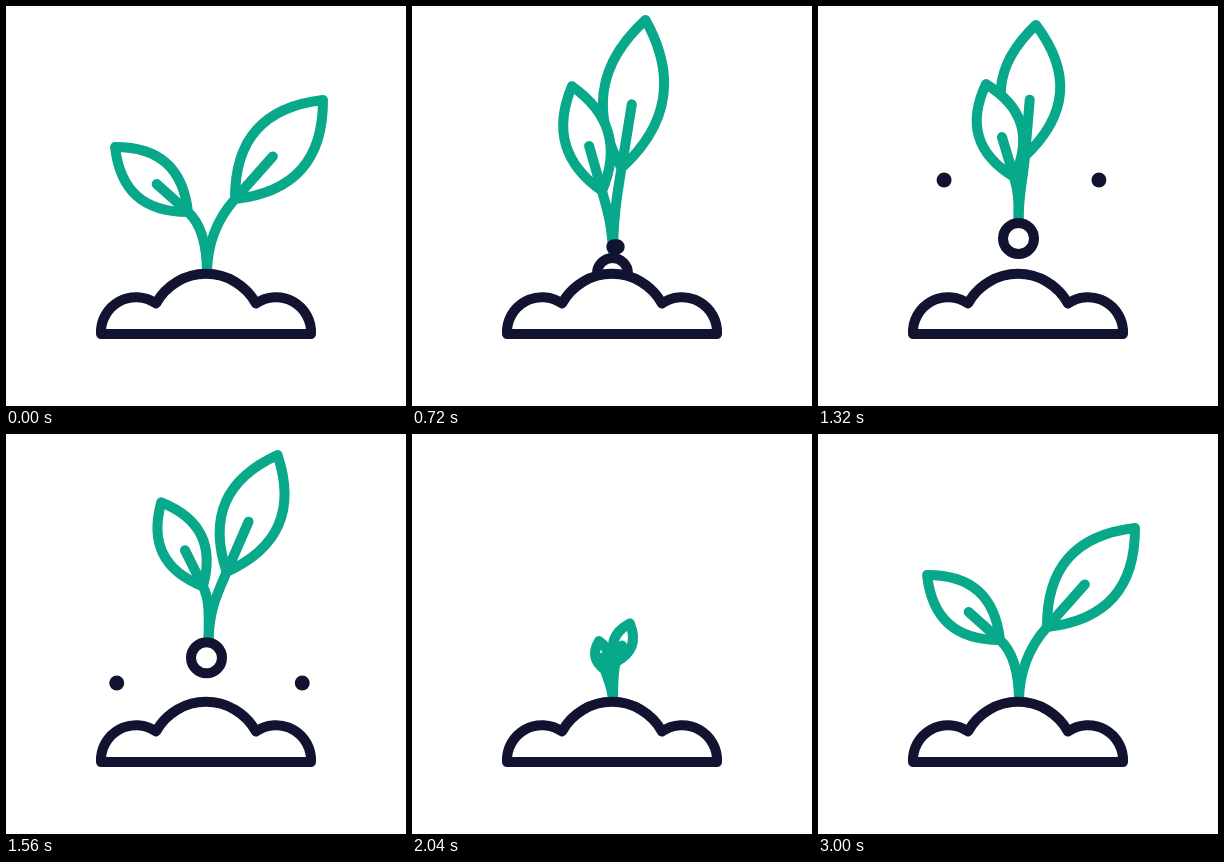
Animation, 400 px wide and 400 px high, one loop 5.63 s. Source, as an HTML page:

```html
<!DOCTYPE html>
<html lang="en">
<head>
<meta charset="utf-8">
<title>Sprout</title>
<style>
  html, body { margin: 0; height: 100%; overflow: hidden; background: #fff; }
  svg { display: block; width: 100%; height: 100%; }
  .line { fill: none; stroke-width: 10; stroke-linecap: round; stroke-linejoin: round; }
  .filled { fill: #fff; }
  .green { stroke: #08a88a; }
  .dark { stroke: #121331; }
</style>
</head>
<body>
<svg viewBox="0 0 400 400">
  <g id="flyer">
    <path class="line green"/>
    <path class="line green filled"/>
    <circle id="seed" class="line dark filled" cx="200.5" r="15.5"/>
  </g>
  <g id="sprout">
    <path class="line green"/>
    <path class="line green filled"/>
  </g>
  <g id="dots" fill="#121331"><circle r="7.5"/><circle r="7.5"/></g>
  <path class="line dark filled" d="M95 328A35 35 0 0 1 150 297.5A57 57 0 0 1 250 297.5A35 35 0 0 1 305 328Z"/>
</svg>
<script>
const LOOP = 5630, STEP = 30;
const $ = id => document.getElementById(id);
const flyer = $('flyer'), sprout = $('sprout'), seed = $('seed'), dots = $('dots');

// Each key: time, root x y, then per leaf (left, right): base x y, angle from upright, length
const grown = [201, 268, 182, 206, -48.3, 97.7, 229, 193, 41.6, 132.5];
const flyerKeys = [
  [0, ...grown],
  [570, 201, 258, 188, 194, -26, 105, 215, 172, 19, 141],
  [720, 201, 252, 190, 185, -16, 109, 209.5, 162, 9.2, 150],
  [1320, 200.5, 217, 196, 171, -16.8, 97, 207, 150, 4.8, 131.5],
  [1770, 204, 205.5, 197, 141, -32.7, 92.6, 230, 131, 36.3, 126.6]
];
const sproutKeys = [
  [1920, 201, 268, 201, 268, -5, 0, 201, 268, 5, 0],
  [2040, 201, 268, 193, 236, -11.7, 29.6, 204, 228, 19.7, 41],
  [2520, 201, 268, 187, 212, -42.6, 85.6, 222, 199, 37.7, 116],
  [3000, ...grown]
];

const clamp = x => Math.min(1, Math.max(0, x));
const progress = (t, from, to) => clamp((t - from) / (to - from));
const smooth = p => p * p * (3 - 2 * p);

// Smooth curve through the keys, at rest at both ends
function sample(keys, t) {
  const last = keys.length - 1;
  let i = 0;
  while (i < last - 1 && t > keys[i + 1][0]) i++;
  const a = keys[i], b = keys[i + 1], span = b[0] - a[0];
  const p = progress(t, a[0], b[0]), q = 1 - p;
  const slope = (k, c) => k === 0 || k === last ? 0 :
    (keys[k + 1][c] - keys[k - 1][c]) / (keys[k + 1][0] - keys[k - 1][0]) * span;
  return a.slice(1).map((v, n) => {
    const c = n + 1;
    return v + (b[c] - v) * smooth(p) + p * q * (q * slope(i, c) - p * slope(i + 1, c));
  });
}

function leafPath(rootX, rootY, [x, y, angle, length], fullLength) {
  const a = angle * Math.PI / 180, sin = Math.sin(a), cos = Math.cos(a);
  const bulge = 0.3 * Math.min(length, fullLength);
  const at = (along, side) => {
    const u = along * length, v = side * bulge;
    return `${(x + u * sin + v * cos).toFixed(2)} ${(y - u * cos + v * sin).toFixed(2)}`;
  };
  const outline = `M${at(0, 0)}C${at(.335, -1)} ${at(.665, -1)} ${at(1, 0)}` +
    `C${at(.665, 1)} ${at(.335, 1)} ${at(0, 0)}Z`;
  const vein = `M${at(0, 0)}L${at(.43, 0)}`;
  const bend = rootY - (rootY - y) * .45;
  const stem = `M${rootX} ${rootY}C${rootX} ${bend} ${at(-.18, 0)} ${at(0, 0)}` +
    `C${at(-.18, 0)} ${rootX} ${bend} ${rootX} ${rootY}`;
  return outline + vein + stem;
}

function drawPlant(group, pose) {
  const [rootX, rootY] = pose, [right, left] = group.querySelectorAll('path');
  right.setAttribute('d', leafPath(rootX, rootY, pose.slice(6), 132.5));
  left.setAttribute('d', leafPath(rootX, rootY, pose.slice(2, 6), 97.7));
}

const show = (element, visible) => element.setAttribute('visibility', visible ? 'visible' : 'hidden');

function drawDots(t) {
  const out = progress(t, 705, 1200), fall = progress(t, 1290, 1650);
  const spread = 74 * smooth(out) + 23 * fall;
  const y = 245 - 72 * (1 - (1 - out) ** 2) + 135 * fall * fall;
  [...dots.children].forEach((dot, i) => {
    dot.setAttribute('cx', 203.5 + (i ? 1 : -1) * (1.5 + spread));
    dot.setAttribute('cy', y);
  });
  show(dots, t >= 705 && t < 1650);
}

function render(t) {
  const pose = sample(flyerKeys, t);
  drawPlant(flyer, pose);
  seed.setAttribute('cy', pose[1] + 15.5);
  show(seed, t >= 570 && t < 1980);
  const away = progress(t, 1770, 1980) ** 2;
  flyer.setAttribute('transform',
    `translate(${320 * away} ${-300 * away}) rotate(${35 * away} 200.5 221)`);
  show(flyer, t < 1980);

  drawPlant(sprout, sample(sproutKeys, t));
  show(sprout, t >= 1920);
  drawDots(t);
}

const start = performance.now();
function tick() {
  const t = (performance.now() - start) % LOOP;
  render(Math.floor(t / STEP) * STEP);
  requestAnimationFrame(tick);
}
tick();
</script>
</body>
</html>
```
